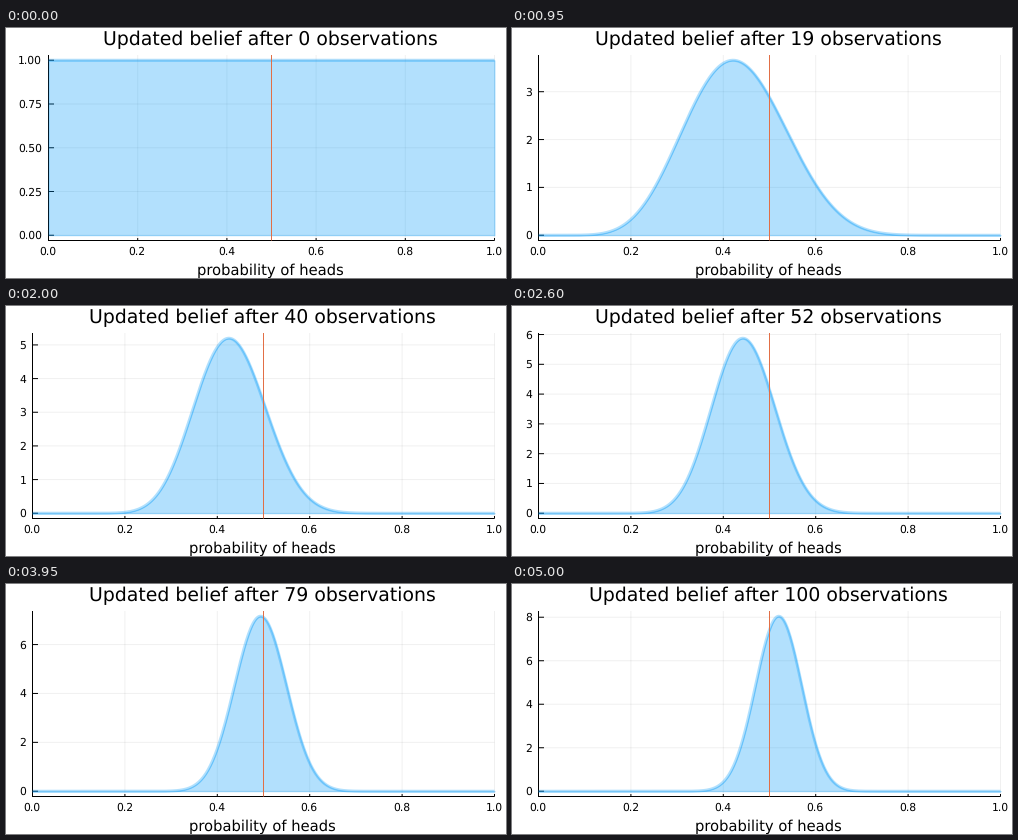
Recreate the animation shown at these times as a matplotlib script. Size 500 by 250 pixels, loop 5.05 s.

```python
import math

import matplotlib.pyplot as plt
import numpy as np
from matplotlib.animation import FuncAnimation

W, H, DPI = 500, 250, 100
FLIPS = 100
RIGHT, TOP, BOTTOM = 488.5, 27.0, 212.5
PAD = (BOTTOM - TOP) * 0.03 / 1.06
BASE, PEAK = BOTTOM - PAD, TOP + PAD
BLUE, ORANGE = "#009AFA", "#E26F46"

plt.rcParams["font.family"] = "DejaVu Sans"
plt.rcParams["text.hinting"] = "none"

# Heads counted so far, at a few points along the run of flips
SEEN = [0, 11, 28, 52, 65, 79, 100]
HEADS = [0, 5, 11, 23, 30, 39, 52]

fig = plt.figure(figsize=(W / DPI, H / DPI), dpi=DPI, facecolor="white")
ax = fig.add_axes([0, 0, 1, 1])
p = np.linspace(0, 1, 401)


def px(size):
    return size * 72 / DPI


def posterior(n):
    """Density of Beta(1 + heads, 1 + tails) under a flat prior."""
    h = int(round(float(np.interp(n, SEEN, HEADS))))
    return (n + 1) * math.comb(n, h) * p**h * (1 - p) ** (n - h)


def layout(top):
    """Tick step, label format and left edge for an axis reaching top."""
    if top < 1.2:
        return 0.25, ".2f", 42.5
    if top < 3:
        return 0.5, ".1f", 35.5
    return (1 if top < 7 else 2), ".0f", 26.5


def rule(x, y, color="black", width=1.0, **kw):
    ax.plot(x, y, color=color, lw=px(width), solid_capstyle="butt",
            snap=False, **kw)


def label(x, y, text, size, ha="center"):
    ax.text(x, y, text, fontsize=px(size), ha=ha, va="baseline")


def draw(n):
    ax.clear()
    ax.set_xlim(0, W)
    ax.set_ylim(H, 0)
    ax.axis("off")

    density = posterior(n)
    high = density.max()
    step, fmt, left = layout(high * 1.03)
    mid = (left + RIGHT) / 2

    xs = left + (RIGHT - left) * p
    ys = BASE - (BASE - PEAK) * density / high
    xticks = [(v, left + (RIGHT - left) * v) for v in np.arange(6) / 5]
    count = int(high * 1.03 / step + 1e-9) + 1
    yticks = [(k * step, BASE - (BASE - PEAK) * k * step / high)
              for k in range(count)]

    for _, x in xticks:
        rule([x, x], [TOP, BOTTOM], alpha=0.06)
    for _, y in yticks:
        rule([left, RIGHT], [y, y], alpha=0.06)

    rule([left, left], [TOP, BOTTOM + 0.5])
    rule([left, RIGHT], [BOTTOM, BOTTOM])
    for v, x in xticks:
        rule([x, x], [BOTTOM, BOTTOM - 2.5])
        label(x - 0.5, 226.5, f"{v:.1f}", 10.8)
    for v, y in yticks:
        rule([left, left + 5.5], [y, y])
        label(left - 6.3, y + 4, f"{v:{fmt}}", 10.8, "right")

    ax.fill_between(xs, ys, BASE, color=BLUE, alpha=0.3, lw=px(1),
                    snap=False, zorder=2)
    rule(xs, ys, BLUE, 3, alpha=0.3, zorder=3)
    rule([mid, mid], [TOP, BOTTOM], ORANGE, zorder=4)

    label(mid - 1, 17.5, f"Updated belief after {n} observations", 18.85)
    label(mid - 1, 247, "probability of heads", 14.75)
    return []


anim = FuncAnimation(fig, draw, frames=FLIPS + 1, interval=50,
                     init_func=lambda: [], repeat=True, repeat_delay=0)
plt.show()
```
